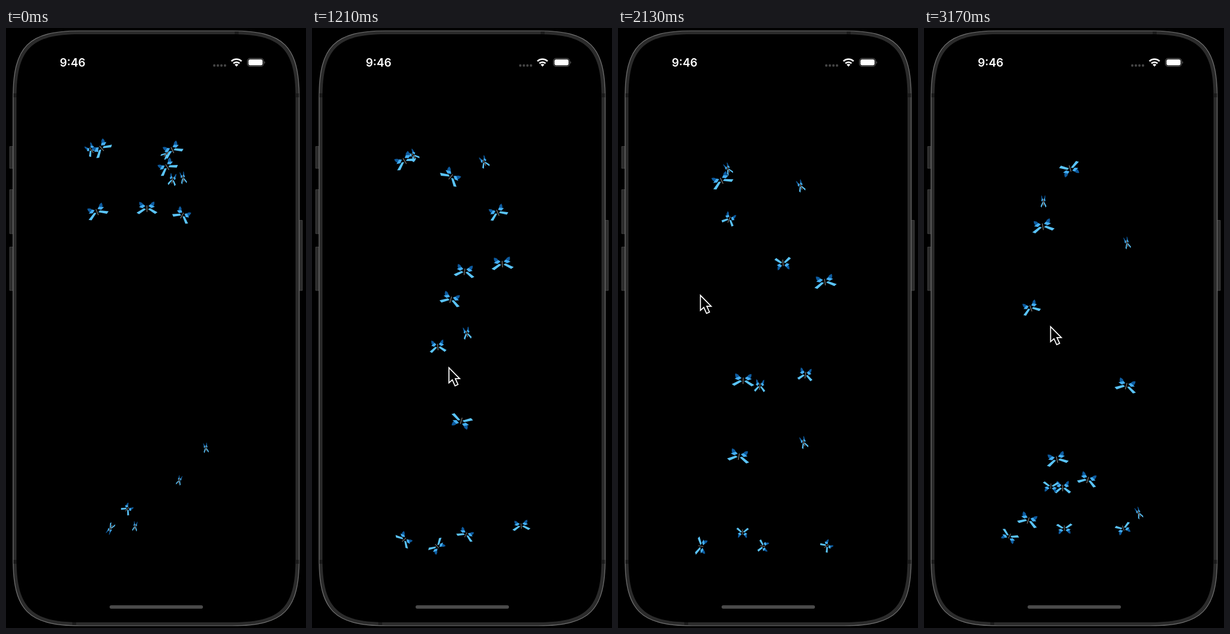
Recreate the animation shown at these times as an HTML page. Size 530x1056 px, loop 3210 ms.

```html
<!DOCTYPE html>
<html lang="en">
<head>
<meta charset="utf-8">
<title>Butterflies</title>
<style>
  html, body { margin: 0; width: 100%; height: 100%; overflow: hidden; background: #000; }
  svg { display: block; width: 530px; height: 1056px; }
  text { font: 600 20px Inter, sans-serif; fill: #fff; text-anchor: middle; }
</style>
</head>
<body>
<svg viewBox="0 0 530 1056">
  <defs>
    <!-- right half of a butterfly that flies downwards, fully open -->
    <g id="wing">
      <path fill="#0d5a9e" d="M15 -13Q8 -12 7 -7L13 -4.500Q16 -8 15 -13Z"/>
      <path fill="#43aef2" d="M3 -5L7 -8L16 -3.500L9 -1Z"/>
      <path fill="#5ac4fb" d="M2 1L6 -1L21 7L16 10Z"/>
    </g>
  </defs>

  <path d="M12 208.500H6.500V247H12M12 284.500H6.500V362H12M12 385.500H6.500V462H12M518 338.500H523.500V462H518"
        fill="#2c2c2c" stroke="#4b4b4b" stroke-width=".8"/>
  <path id="case" fill="#2b2b2b" stroke="#757575" stroke-width="1.200"/>
  <path fill="#1b1b1b" d="M13 115h6v7h-6zM512 115h5.500v7H512zM13 936h6v7h-6zM512 936h5.500v7H512zM404 6h7v6h-7zM117 1045h7v6h-7z"/>
  <path id="glass"/>

  <text x="117.700" y="68">9:46</text>
  <path d="M368 66h20" stroke="#444" stroke-width="4.400" stroke-linecap="round" stroke-dasharray="0 6.300"/>
  <path d="M398.300 58.600a12.500 12.500 0 0 1 17.800 0M401.800 62.300a7.600 7.600 0 0 1 10.800 0"
        fill="none" stroke="#fff" stroke-width="2.800"/>
  <path fill="#fff" d="M403.900 64.600a4.700 4.700 0 0 1 6.600 0L407.200 68Z"/>
  <rect x="426.500" y="53.500" width="28.500" height="14" rx="4.500" fill="none" stroke="#707070"/>
  <rect x="428.300" y="55.300" width="25" height="10.500" rx="3" fill="#fff"/>
  <path d="M456.500 58.500q2.200 2 0 4.500z" fill="#707070"/>
  <rect x="183" y="1016" width="165" height="6" rx="3" fill="#4a4a4a"/>

  <g id="flock"></g>
  <path id="cursor" d="M1 1V27.500L7 22.300L11.800 32.800L17 30.400L12.300 20.200H20Z"
        stroke="#fff" stroke-width="1.800"/>
</svg>

<script>
const LOOP = 3210, STEP = 1000 / 24, LAST_STEP = 76, FLIGHT = 3.17, FLAP = 0.5;
const TOP = 205, BOTTOM = 915;
const byId = id => document.getElementById(id);
const lerp = (a, b, k) => a + (b - a) * k;
const radians = degrees => degrees * Math.PI / 180;

// Rectangle whose corners bend in gradually
function softRect(left, top, right, bottom, corner) {
  const pull = corner * .23;
  return `M${left + corner} ${top}H${right - corner}
    C${right - pull} ${top} ${right} ${top + pull} ${right} ${top + corner}V${bottom - corner}
    C${right} ${bottom - pull} ${right - pull} ${bottom} ${right - corner} ${bottom}H${left + corner}
    C${left + pull} ${bottom} ${left} ${bottom - pull} ${left} ${bottom - corner}V${top + corner}
    C${left} ${top + pull} ${left + pull} ${top} ${left + corner} ${top}Z`;
}
byId('case').setAttribute('d', softRect(12.5, 5, 518, 1052, 118));
byId('glass').setAttribute('d', softRect(18.5, 11, 511.5, 1046, 112));

// Crossing between top and bottom: slow at both ends, fast in the middle
function cross(y0, y1, s) {
  const logit = y => Math.log((y - TOP) / (BOTTOM - y));
  const y = TOP + (BOTTOM - TOP) / (1 + Math.exp(-lerp(logit(y0), logit(y1), s)));
  return { y, along: (y - y0) / (y1 - y0) };
}

// Touching the bottom and rising again along a parabola
function skim(y0, y1, s) {
  const root = y => Math.sqrt(BOTTOM - 3 - y);
  return { y: BOTTOM - 3 - lerp(root(y0), -root(y1), s) ** 2, along: s };
}

// flat: part of the flap cycle at which the wings lie open; bend: sideways bulge of the path
const flies = [];
function fly(glide, flat, from, to, bend) {
  const node = document.createElementNS('http://www.w3.org/2000/svg', 'g');
  node.innerHTML = '<use href="#wing"/><use href="#wing"/>' +
    '<path d="M0 -6V6" stroke="#77706a" stroke-width="1.500"/>';
  byId('flock').append(node);
  const position = t => {
    const { y, along } = glide(from[1], to[1], t / FLIGHT);
    return [lerp(from[0], to[0], along) + 4 * bend * along * (1 - along), y];
  };
  flies.push({ node, position, flat, size: glide === skim ? .78 : .95 });
}

fly(cross, .35, [151, 215], [210, 350], 9);
fly(cross, .81, [169, 212], [211, 307], 10);
fly(cross, .57, [283, 222], [189, 494], -48);
fly(cross, .82, [294, 215], [359, 380], 4);
fly(cross, .20, [285, 245], [357, 631], 43);
fly(cross, .60, [294, 268], [245, 810], -12);
fly(cross, .54, [313, 265], [289, 796], 37);
fly(cross, .15, [161, 324], [184, 867], 52);
fly(cross, .82, [249, 318], [380, 855], -30);
fly(cross, .24, [311, 330], [235, 760], -44);
fly(cross, .52, [185, 880], [258, 247], 68);
fly(skim, .55, [353, 740], [352, 880], 18);
fly(skim, .54, [306, 797], [248, 880], -13);
fly(skim, .32, [214, 847], [151, 894], -29);
fly(skim, .54, [228, 878], [224, 806], -6);

function drawFly({ node, position, flat, size }, t) {
  const [x, y] = position(t), [nextX, nextY] = position(t + .002);
  const heading = Math.atan2(nextY - y, nextX - x) * 180 / Math.PI - 90;
  const lift = 38 * (1 - Math.cos(2 * Math.PI * (t / FLAP - flat)));
  const spread = Math.cos(radians(lift));
  node.setAttribute('transform', `translate(${x} ${y}) rotate(${heading}) scale(${size})`);
  node.children[0].setAttribute('transform', `scale(${spread} 1)`);
  node.children[1].setAttribute('transform', `scale(${-spread} 1)`);
}

// time, x, y
const pointer = [[.83, 474, 690], [.958, 321.5, 626.5], [1.458, 160.5, 567.5],
  [1.833, 146, 491.5], [2.458, 143, 444.5], [3.17, 223, 525]];

function drawCursor(t) {
  const i = pointer.findIndex(([time]) => t <= time);
  byId('cursor').style.display = i > 0 ? '' : 'none';
  if (i < 1) return;
  const [t0, x0, y0] = pointer[i - 1], [t1, x1, y1] = pointer[i];
  const k = (t - t0) / (t1 - t0);
  byId('cursor').setAttribute('transform', `translate(${lerp(x0, x1, k)} ${lerp(y0, y1, k)})`);
}

const start = performance.now();
function draw() {
  const elapsed = (performance.now() - start) % LOOP;
  const t = Math.min(LAST_STEP, Math.floor((elapsed + 5) / STEP)) * STEP / 1000;
  flies.forEach(f => drawFly(f, t));
  drawCursor(t);
  requestAnimationFrame(draw);
}
draw();
</script>
</body>
</html>
```
